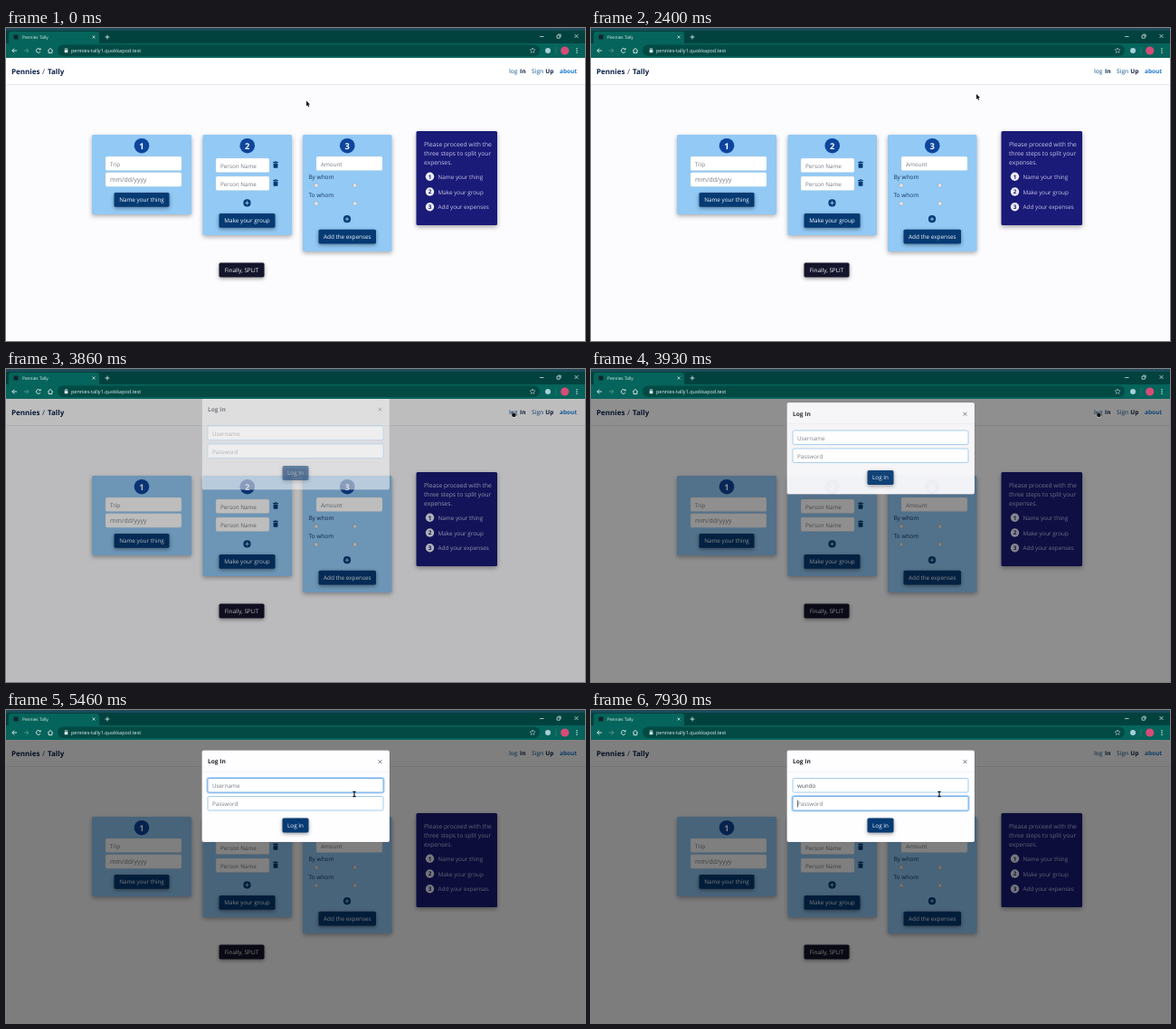
An HTML page with a canvas for the animation above (8 s loop, 640x346 px).

```html
<!DOCTYPE html>
<html lang="en">
<head>
<meta charset="utf-8">
<title>Pennies Tally</title>
<style>
html, body { margin: 0; width: 100%; height: 100%; overflow: hidden; background: #fcfcfe; }
canvas { display: block; width: 100vw; height: 100vh; }
</style>
</head>
<body>
<canvas id="stage"></canvas>
<script>
const W = 640, H = 346, LOOP = 8000, TOP = 33;
const canvas = document.getElementById('stage');
const ctx = canvas.getContext('2d');
const ratio = Math.max(1, window.devicePixelRatio || 1);
canvas.width = W * ratio;
canvas.height = H * ratio;
ctx.scale(ratio, ratio);
if ('textRendering' in ctx) ctx.textRendering = 'geometricPrecision';

const FONT = '"Open Sans", "Noto Sans", sans-serif';
const NAVY = '#053a73', CARD = '#92c9f5', HINT = '#757b82', INK = '#0b2147';
const USER = 'wundo';

function text(str, x, y, size, color, weight = 400, align = 'left') {
  ctx.font = `${weight} ${size}px ${FONT}`;
  ctx.textAlign = align;
  ctx.fillStyle = color;
  ctx.fillText(str, x, y);
}

function rect(x, y, w, h, color) {
  ctx.fillStyle = color;
  ctx.fillRect(x, y, w, h);
}

function box(x, y, w, h, r, fill, stroke, line = 0.6) {
  ctx.beginPath();
  ctx.roundRect(x, y, w, h, r);
  if (fill) { ctx.fillStyle = fill; ctx.fill(); }
  if (stroke) { ctx.strokeStyle = stroke; ctx.lineWidth = line; ctx.stroke(); }
}

function disc(x, y, r, color) {
  ctx.beginPath();
  ctx.arc(x, y, r, 0, Math.PI * 2);
  ctx.fillStyle = color;
  ctx.fill();
}

function lines(color, width, ...paths) {
  ctx.strokeStyle = color;
  ctx.lineWidth = width;
  ctx.beginPath();
  for (const p of paths) {
    ctx.moveTo(p[0], p[1]);
    for (let i = 2; i < p.length; i += 2) ctx.lineTo(p[i], p[i + 1]);
  }
  ctx.stroke();
}

function shape(points, fill, stroke) {
  ctx.beginPath();
  for (let i = 0; i < points.length; i += 2) ctx.lineTo(points[i], points[i + 1]);
  ctx.closePath();
  if (stroke) { ctx.strokeStyle = stroke; ctx.lineWidth = 0.8; ctx.stroke(); }
  if (fill) { ctx.fillStyle = fill; ctx.fill(); }
}

function shadowed(blur, dy, alpha, draw) {
  ctx.save();
  ctx.shadowColor = `rgba(0,0,0,${alpha})`;
  ctx.shadowBlur = blur * ratio;
  ctx.shadowOffsetY = dy * ratio;
  draw();
  ctx.restore();
}

function cross(x, y, r, color, width) {
  lines(color, width, [x - r, y - r, x + r, y + r], [x + r, y - r, x - r, y + r]);
}

function plus(x, y, r, color, width) {
  lines(color, width, [x - r, y, x + r, y], [x, y - r, x, y + r]);
}

// Piecewise linear value through [time, ...values] points.
function track(points, t) {
  let i = 0;
  while (i < points.length - 2 && t >= points[i + 1][0]) i++;
  const a = points[i], b = points[i + 1];
  const p = Math.min(1, Math.max(0, (t - a[0]) / (b[0] - a[0])));
  return a.slice(1).map((v, n) => v + (b[n + 1] - v) * p);
}

function drawBrowser() {
  const bar = '#05645b', pale = '#e6f1ef';
  rect(0, 0, W, TOP, '#02423e');
  rect(0, 0, W, 3, '#1d4a5b');
  box(3, 4, 100, 14, [3, 3, 0, 0], bar);
  rect(0, 17, W, 16, bar);

  rect(8.5, 7.5, 5, 5, '#10262a');
  text('Pennies Tally', 18, 12, 4.8, pale);
  cross(97, 10, 1.5, pale, 0.7);
  plus(112, 10, 2.4, pale, 0.8);
  lines(pale, 0.7, [590, 9.5, 594.5, 9.5]);
  box(609, 8, 3.2, 3.2, 0, null, pale, 0.7);
  lines(pale, 0.6, [610, 7, 613.2, 7, 613.2, 10]);
  cross(630.5, 9, 2, pale, 0.7);

  lines(pale, 0.9, [12, 25, 6.8, 25], [9.2, 22.6, 6.8, 25, 9.2, 27.4]);
  lines('#5b9790', 0.9, [19.8, 25, 25, 25], [22.6, 22.6, 25, 25, 22.6, 27.4]);
  ctx.strokeStyle = pale;
  ctx.beginPath();
  ctx.arc(35.8, 25, 2.4, 0.5, 5.6);
  ctx.stroke();
  shape([36.3, 24.2, 38.5, 24.2, 38.5, 22], pale);
  lines(pale, 0.9, [46.2, 25, 49, 22.4, 51.8, 25], [47.1, 24.6, 47.1, 27.6, 50.9, 27.6, 50.9, 24.6]);

  box(57, 18.5, 533, 12.5, 6.2, '#034a45');
  rect(64.7, 24.2, 3.6, 3, pale);
  lines(pale, 0.7, [65.4, 24.4, 65.4, 22.7, 67.6, 22.7, 67.6, 24.4]);
  text('pennies-tally1.quokkapod.test', 72, 27, 5.5, pale);

  const star = [];
  for (let i = 0; i < 10; i++) {
    const a = -Math.PI / 2 + i * Math.PI / 5, r = i % 2 ? 1.2 : 2.8;
    star.push(582 + r * Math.cos(a), 25 + r * Math.sin(a));
  }
  shape(star, '#034a45', pale);
  disc(599, 25, 3, '#a9cfd8');
  lines('#3b837c', 0.6, [608, 21, 608, 29]);
  disc(617.7, 25, 4.6, '#d64c78');
  for (const y of [22.7, 25, 27.3]) disc(631, y, 0.7, pale);
}

function button(label, x, y, w, h = 15.8, color = NAVY) {
  shadowed(4, 1.5, 0.4, () => box(x, y, w, h, 1.6, color));
  text(label, x + w / 2, y + h / 2 + 2.4, 6.35, '#f4f7fb', 400, 'center');
}

function field(label, x, y, w, size = 6.3) {
  box(x, y, w, 15.5, 1.6, '#fff', '#c9d5e0', 0.4);
  text(label, x + 5, y + 10.5, size, HINT);
}

function card(x, w, h, num) {
  shadowed(5, 2, 0.32, () => box(x, 118, w, h, 1.5, CARD));
  const cx = x + w / 2;
  disc(cx, 130.2, 8.3, '#0d459d');
  text(num, cx, 133.6, 9.4, '#fff', 700, 'center');
}

function trash(x, y) {
  rect(x - 2.9, y - 3.2, 5.8, 1, NAVY);
  rect(x - 1.2, y - 3.8, 2.4, 0.8, NAVY);
  box(x - 2.4, y - 1.7, 4.8, 5.3, 0.7, NAVY);
}

function adder(x, y) {
  disc(x, y, 4.1, NAVY);
  plus(x, y, 2.2, CARD, 0.9);
}

function drawPage(hover) {
  rect(0, TOP, W, H - TOP, '#fcfcfe');
  rect(0, TOP, W, 29, '#fff');
  rect(0, 62, W, 0.8, '#e3e5ea');
  text('Pennies', 6, 51, 8, INK, 700);
  text('/', 40, 51, 8, '#50698d', 600);
  text('Tally', 46, 51, 8, INK, 700);
  text('log', 556, 50.2, 6.5, hover ? '#1d67b0' : '#4a7ca8', 600);
  text('In', 568, 50.2, 6.5, INK, 700);
  text('Sign', 581, 50.2, 6.5, '#4a7ca8', 600);
  text('Up', 596.3, 50.2, 6.5, INK, 700);
  text('about', 612, 50.2, 6.5, '#1b78cc', 700);

  card(95, 110, 88, '1');
  field('Trip', 110, 142, 84);
  field('mm/dd/yyyy', 110, 159.7, 84, 6.95);
  button('Name your thing', 119.5, 182, 61);

  card(217.5, 98.5, 111, '2');
  for (const y of [144, 164]) {
    field('Person Name', 232, y, 59);
    trash(298, y + 7.2);
  }
  adder(266.5, 193.4);
  button('Make your group', 235.5, 205, 62);

  card(328, 98.5, 129, '3');
  field('Amount', 343, 142, 73);
  text('By whom', 334.4, 167.3, 6.5, '#12365f');
  text('To whom', 334.4, 187.2, 6.5, '#12365f');
  for (const y of [174, 194]) {
    for (const x of [343, 385.7]) {
      disc(x, y, 2.4, '#9aa5b0');
      disc(x, y, 1.9, '#e6e4e4');
    }
  }
  adder(377, 211.2);
  button('Add the expenses', 345.5, 222.7, 63.5);

  button('Finally, SPLIT', 235.5, 259.6, 50, 15.8, '#14142b');

  shadowed(5, 2, 0.35, () => box(453.5, 114, 89.5, 104, 1.5, '#1a1a78'));
  const soft = '#c3c6e6';
  ['Please proceed with the', 'three steps to split your', 'expenses.']
    .forEach((s, i) => text(s, 462, 130.6 + i * 10, 6.72, soft));
  ['Name your thing', 'Make your group', 'Add your expenses'].forEach((s, i) => {
    const y = 164.2 + i * 16.8;
    disc(468.5, y, 4.7, '#eceef8');
    text(i + 1, 468.5, y + 2.3, 6.3, '#1a1a78', 700, 'center');
    text(s, 477.5, y + 2.5, 6.35, soft);
  });
}

function entry(label, y, focused, typed, caret) {
  if (focused) box(222.5, y - 0.5, 195, 16.5, 2.2, null, 'rgba(90,165,240,0.45)', 2.2);
  box(223, y, 194, 15.5, 1.6, '#fff', focused ? '#5a9fe0' : '#8fbfe6', 0.8);
  text(typed || label, 228, y + 10.6, 6.3, typed ? '#495057' : HINT);
  if (caret) {
    const w = typed ? ctx.measureText(typed).width : 0;
    rect(228 + w, y + 4, 0.6, 8, '#222');
  }
}

function drawModal(t) {
  const [shade, alpha, lift] = track([
    [3775, 0, 0, 21], [3800, 0.055, 0.09, 19], [3866.7, 0.26, 0.52, 12.5],
    [3933.3, 0.44, 0.93, 7.5], [4000, 0.5, 1, 3.3], [4066.7, 0.5, 1, 1], [4133, 0.5, 1, 0]
  ], t);
  if (!shade) return;
  ctx.save();
  ctx.beginPath();
  ctx.rect(0, TOP, W, H - TOP);
  ctx.clip();
  rect(0, TOP, W, H - TOP, `rgba(0,0,0,${shade})`);
  ctx.globalAlpha = alpha;
  ctx.translate(0, -lift);
  box(216.5, 44.5, 207.5, 101.5, 2, '#fefdff', 'rgba(0,0,0,0.2)', 0.5);
  text('Log In', 223, 59.3, 6.6, '#212529', 700);
  cross(413.5, 57.2, 1.9, '#6f6f74', 1);
  rect(216.5, 68, 207.5, 0.5, '#e4e6ea');

  const onName = t >= 4130 && t < 7450, onPass = t >= 7450;
  const count = Math.max(0, Math.min(USER.length, Math.floor((t - 5900) / 250) + 1));
  const typed = USER.slice(0, count);
  entry('Username', 75.5, onName, typed, onName && count > 0 && t < 7200);
  entry('Password', 95.5, onPass, '', onPass);
  button('Log In', 305.5, 119.6, 29);
  ctx.restore();
}

function drawCursor(t) {
  const [x, y] = track([
    [1700, 332, 80.5], [2400, 426, 73], [3200, 559.5, 46.5],
    [4060, 559.5, 46.5], [4400, 520, 60], [4900, 385, 93]
  ], t);
  ctx.save();
  ctx.translate(x, y);
  if (t >= 4860) {
    lines('#111', 1.1, [0, -2.6, 0, 2.6], [-1.6, -2.6, 1.6, -2.6], [-1.6, 2.6, 1.6, 2.6]);
  } else if (t > 3170 && t <= 4070) {
    shape([0, 0, 1, 0, 1.2, 2.3, 4, 3, 4, 5, 3.2, 6.6, 1, 6.6, -0.9, 4.2, 0, 3.8],
      '#111', 'rgba(255,255,255,0.7)');
  } else {
    shape([0, 0, 0, 5.8, 1.3, 4.7, 2.2, 6.7, 3.2, 6.2, 2.3, 4.3, 4, 4.1],
      '#111', 'rgba(255,255,255,0.7)');
  }
  ctx.restore();
}

function render(ms) {
  const t = Math.floor((ms % LOOP + 6.7) * 0.015) / 0.015 % LOOP;
  drawPage(t > 3170 && t < 4070);
  drawBrowser();
  drawModal(t);
  drawCursor(t);
}

const start = performance.now();
function loop() {
  render(performance.now() - start);
  requestAnimationFrame(loop);
}
loop();
</script>
</body>
</html>
```
